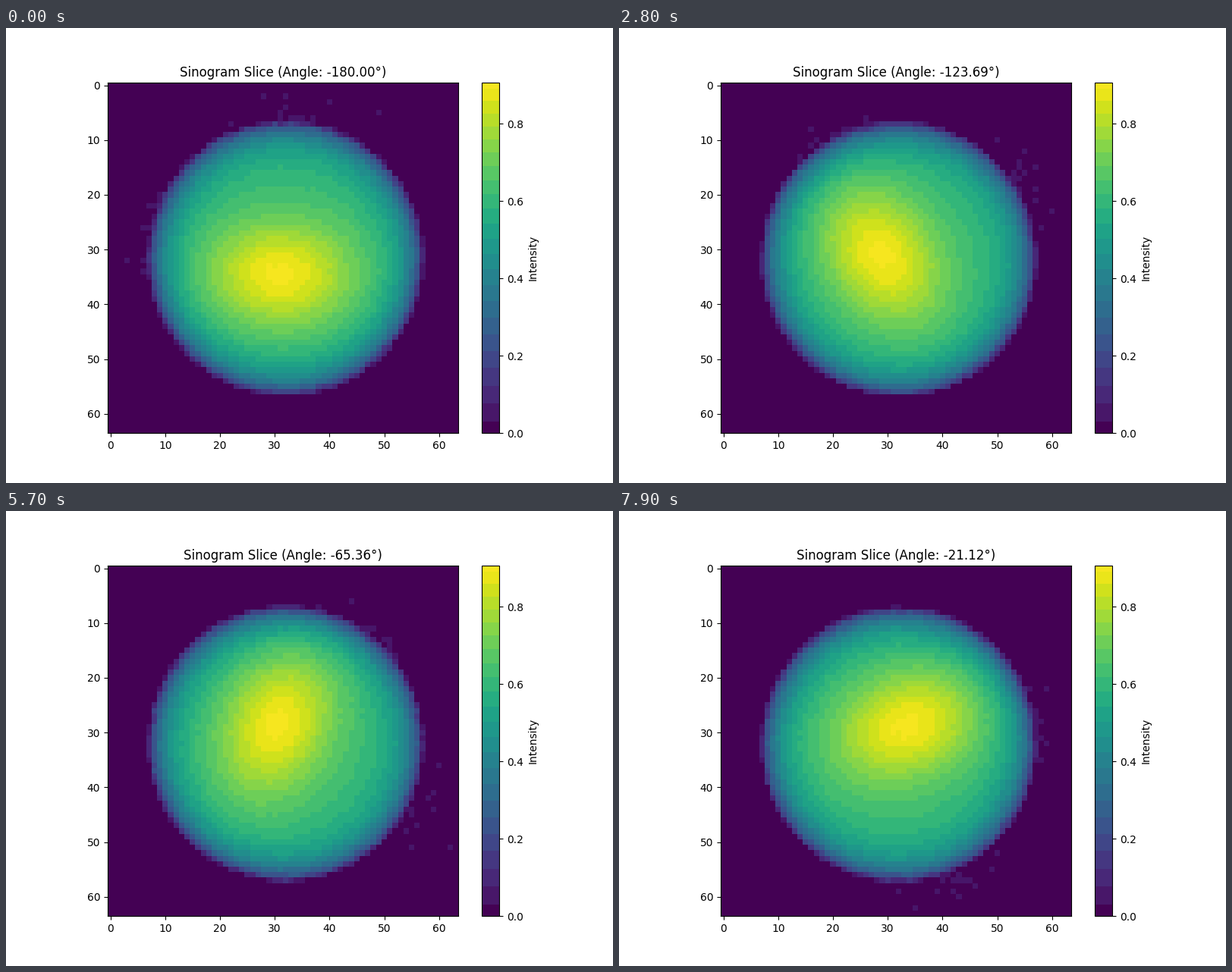
These frames come from a looping animation (800 px wide and 600 px high, 8 s). A matplotlib script:

```python
import numpy as np
import matplotlib.pyplot as plt
from matplotlib.animation import FuncAnimation
from matplotlib.colors import ListedColormap

FRAMES, STEP, N, VMAX = 80, 360 / 179, 64, 0.906
yy, xx = np.mgrid[:N, :N].astype(float)


def banded_viridis(bands=22):
    """Viridis in flat steps that get finer towards the top."""
    s = np.linspace(0, 1, bands + 1)
    edges = 0.03 + 0.86 * (s + 0.2 * s * (1 - s))
    bounds = np.concatenate([[0], edges, [VMAX]])
    mids = (bounds[1:] + bounds[:-1]) / 2 / VMAX
    mids[0], mids[-1] = 0, 0.985
    values = (np.arange(512) + 0.5) / 512 * VMAX
    return ListedColormap(plt.cm.viridis(mids[np.searchsorted(edges, values)]))


def make_specks(angle, spread, reach, count, seed):
    rng = np.random.default_rng(seed)
    phi = np.radians(angle + rng.normal(0, spread, count))
    rad = 25.2 + rng.exponential(reach, count)
    return phi, rad


SPECKS = [make_specks(-88, 9, 2.3, 24, 3), make_specks(193, 10, 1.1, 18, 8)]


def projection(k):
    t = np.radians(k * STEP)
    c, s = np.cos(t), np.sin(t)
    rng = np.random.default_rng(100 + k)

    # ball with a flat plateau
    r = np.hypot(xx - 32, yy - 31.6 - 0.3 * (1 - c)) / 25.3
    img = 0.605 * np.clip(1 - r**6, 0, 1) ** 0.7

    # long hot core, turning with the scan angle
    dx = xx - (32.96 - 1.96 * c - 3.59 * s)
    dy = yy - (32.06 + 2.44 * c - 2.73 * s)
    u, v = dx * c + dy * s, dy * c - dx * s
    core = 0.297 * np.exp(-0.5 * ((u / 9.6) ** 2 + (v / 7) ** 2))
    img += core * (r < 1)

    grain = 0.0025 + 0.015 * np.exp(-(((r - 0.97) / 0.03) ** 2))
    img += rng.normal(0, 1, img.shape) * grain * (r < 1.01)

    # faint stray pixels circling the ball
    for phi, rad in SPECKS:
        seen = rng.random(phi.size) < 0.7
        px = np.rint(32 + rad * np.cos(phi + t))[seen].astype(int)
        py = np.rint(32 + rad * np.sin(phi + t))[seen].astype(int)
        ok = (px >= 0) & (px < N) & (py >= 0) & (py < N)
        img[py[ok], px[ok]] = np.maximum(img[py[ok], px[ok]], 0.05)
    return np.clip(img, 0, VMAX)


fig, ax = plt.subplots(figsize=(8, 6), dpi=100)
im = ax.imshow(projection(0), cmap=banded_viridis(), vmin=0, vmax=VMAX,
               interpolation="nearest")
fig.colorbar(im, ax=ax, label="Intensity")
title = ax.set_title("")


def update(k):
    im.set_data(projection(k))
    title.set_text(f"Sinogram Slice (Angle: {-180 + k * STEP:.2f}°)")
    return im, title


anim = FuncAnimation(fig, update, frames=FRAMES, interval=100,
                     repeat=True, repeat_delay=0)
plt.show()
```
